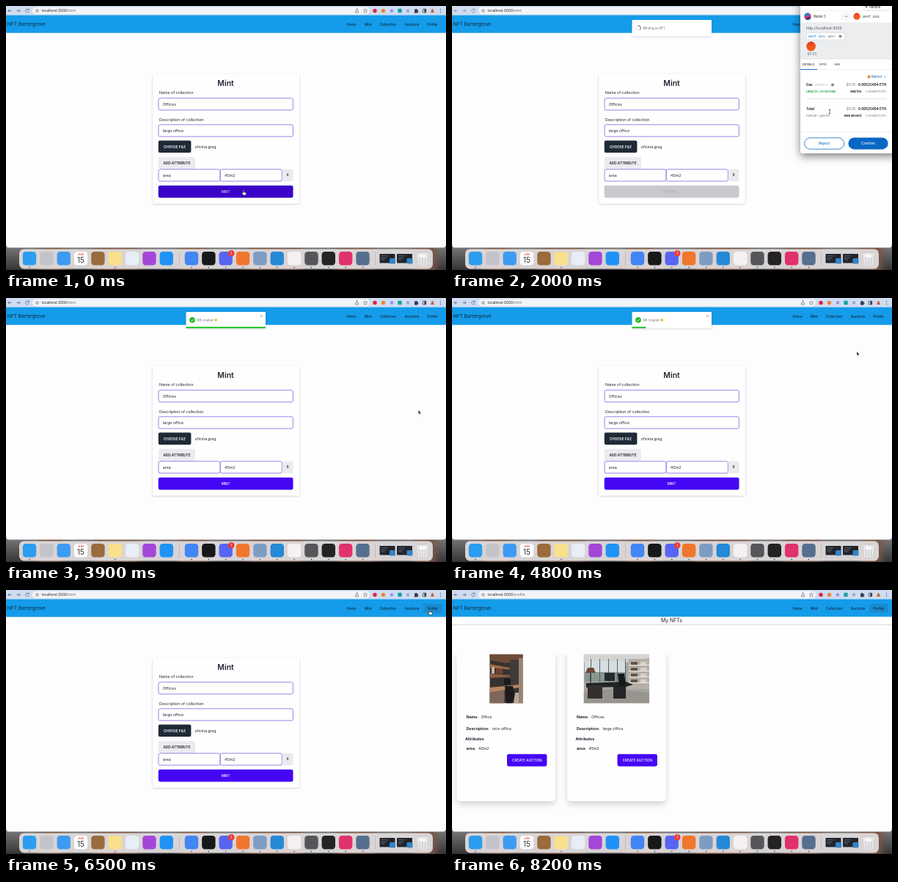
These frames come from a looping animation (600 px wide and 360 px high, 8300 ms). An HTML page:

```html
<!DOCTYPE html>
<html lang="en">
<head>
<meta charset="utf-8">
<title>Minting an NFT</title>
<style>
html, body { margin: 0; width: 100%; height: 100%; overflow: hidden; background: #fff; }
svg { display: block; width: 100vw; height: 100vh; }
text { font-family: Inter, Roboto, sans-serif; white-space: pre; }
</style>
</head>
<body>
<svg id="stage" viewBox="0 0 600 360" xmlns="http://www.w3.org/2000/svg"></svg>
<script>
const LOOP = 8300;
const VIOLET = '#4506f5', INK = '#1f2430', BLUE = '#0b69c4';

const rect = (x, y, w, h, fill, r = 0, more = '') =>
  `<rect x="${x}" y="${y}" width="${w}" height="${h}" rx="${r}" fill="${fill}" ${more}/>`;
const circle = (x, y, r, fill, more = '') =>
  `<circle cx="${x}" cy="${y}" r="${r}" fill="${fill}" ${more}/>`;
const line = (d, color, w = 0.7, more = '') =>
  `<path d="${d}" fill="none" stroke="${color}" stroke-width="${w}" ${more}/>`;
const shape = (d, fill) => `<path d="${d}" fill="${fill}"/>`;
const text = (x, y, size, str, fill = INK, weight = 400, anchor = 'start') =>
  `<text x="${x}" y="${y}" font-size="${size}" font-weight="${weight}" fill="${fill}" text-anchor="${anchor}">${str}</text>`;
const group = (id, body, more = '') => `<g id="${id}" ${more}>${body}</g>`;
const shadow = (id, dy, blur, alpha) =>
  `<filter id="${id}" x="-20%" y="-20%" width="140%" height="150%"><feDropShadow dx="0" dy="${dy}" stdDeviation="${blur}" flood-color="#000" flood-opacity="${alpha}"/></filter>`;

function toolbar() {
  const gray = '#4f5560';
  const icons = [
    line('M476.5 6v3h4V6M478.5 7.5V3.6M477.2 4.8l1.3-1.3 1.3 1.3', gray, 0.6),
    line('M490 3.7l.8 1.8 2 .2-1.5 1.3.5 2-1.8-1-1.8 1 .5-2-1.5-1.3 2-.2z', gray, 0.5),
    circle(503, 6.5, 2.7, '#e5203e') + circle(514.5, 6.5, 2.7, '#e88632'),
    circle(526, 6.5, 2.2, '#9d8cf0') + rect(534.3, 3.8, 5.4, 5.4, '#16a3a0', 1),
    circle(548, 6.5, 2.2, '#9fa8bd'),
    shape('M557 4.8h1.2a1 1 0 0 1 2 0h1.3v1.4a1 1 0 0 1 0 2v1.2H557z', '#3a3f46'),
    rect(568.3, 4.2, 4.4, 4.6, 'none', 0.5, 'stroke="#333" stroke-width=".7"') + rect(570.5, 4.2, 2.2, 4.6, '#333'),
    circle(581.5, 6.5, 3.2, '#e6cfc0') + circle(581.5, 5.6, 1.2, '#7b4b3b') + shape('M579.2 8.8a2.3 2.1 0 0 1 4.6 0z', '#b5403c'),
    [4.3, 6.5, 8.7].map(y => circle(592.5, y, 0.6, gray)).join('')
  ].join('');
  const controls =
    line('M7.5 6.5H3M5 4.5l-2 2 2 2', gray) + line('M14.5 6.5H19M17 4.5l2 2-2 2', gray) +
    line('M31 5.2A2.3 2.3 0 1 0 31.2 7.2M31.3 3.8V5.4H29.6', gray);
  return rect(0, 0, 600, 12.5, '#cfdcf3') +
    rect(36, 1.6, 460, 9.6, '#f4f4f7', 4.8) +
    group('icons', controls + icons) +
    circle(42.5, 6.5, 1.9, 'none', 'stroke="#5f6368" stroke-width=".6"') + line('M42.5 6.2v1.4M42.5 5.2v.5', gray, 0.6) +
    `<text x="48.5" y="8.2" font-size="4.9" fill="#222">localhost:3000<tspan id="path" fill="#6b6e73">/mint</tspan></text>`;
}

function navbar() {
  const items = [[464.5, 'Home'], [489, 'Mint'], [510, 'Collection'], [543.7, 'Auctions'], [574.5, 'Profile']];
  return rect(0, 12.5, 600, 24.2, '#149be9') +
    text(1.8, 27.2, 6.6, 'NFT Bartergrove', '#12263c') +
    group('hover', rect(569.5, 18.8, 25, 12.4, '#188bcf', 2)) +
    items.map(([x, s]) => text(x, 26.6, 4.65, s, '#0f2740', 500)).join('');
}

const input = (x, y, w, s) =>
  rect(x, y, w, 16.2, '#fff', 2.2, 'stroke="#8064e2" stroke-width=".8"') + text(x + 5.8, y + 10, 5.3, s);

function mintPage() {
  return rect(200, 93, 200, 176.5, '#fefefe', 2, 'filter="url(#soft)"') +
    text(299.5, 109, 10.4, 'Mint', INK, 600, 'middle') +
    text(209, 120.4, 5.25, 'Name of collection') + input(208, 125.7, 183.3, 'Offices') +
    text(209, 156.6, 5.25, 'Description of collection') + input(208, 161.8, 183.3, 'large office') +
    rect(207.8, 183.6, 44.6, 16.5, '#1f2a37', 2) + text(230, 193.5, 4.6, 'CHOOSE FILE', '#fff', 600, 'middle') +
    text(257.6, 193.6, 5.25, 'oficina.jpeg') +
    rect(208, 205.8, 50, 16.2, '#ebebef', 2) + text(233, 215.7, 4.65, 'ADD ATTRIBUTE', INK, 600, 'middle') +
    input(208, 222.7, 84, 'area') + input(292.3, 222.7, 84, '45m2') +
    rect(376.8, 222.4, 14.6, 16.6, '#ebebef', 2) + text(384, 232.4, 4.4, 'X', INK, 600, 'middle') +
    `<rect id="mintBox" x="207.7" y="244.8" width="183.8" height="16.6" rx="2.6"/>` +
    `<text id="mintText" x="299.6" y="254.7" font-size="4.6" font-weight="500" text-anchor="middle"></text>`;
}

const photos = [
  rect(51.5, 87.8, 45, 66.5, '#37322f') +
    shape('M51.5 87.8h45v5l-22 7-23-4z', '#6f4c39') + shape('M51.5 101l27 5v2.4l-27-2.600z', '#a06b49') +
    shape('M51.5 114l28 2v2.4l-28 1.600z', '#8e5b40') + rect(79, 95, 12, 38, '#3f3b3a') +
    rect(91, 93, 5.5, 61.3, '#9c8372') +
    rect(54, 105, 4, 9, '#c9b7a2') + rect(60, 107, 9, 7, '#6d4434') + rect(71, 121, 9, 8, '#1b1a1b') +
    shape('M51.5 133l40-4v4l-40 7z', '#b78661') + shape('M51.5 140l20-4v18.3h-20z', '#7d685b') +
    shape('M72 131h11l3 12-4 11.3h-8z', '#1d1b1c') + shape('M86 140h5v14.3h-7z', '#b8a89b'),
  rect(179.8, 87.8, 89.2, 66.5, '#a4a4a1') +
    shape('M179.8 87.8h89.2v5l-30 6h-59.2z', '#d3d4d2') + rect(181, 97, 55, 28, '#d4dde0') +
    rect(181, 112, 55, 13, '#889691') +
    [189, 201, 213, 225, 236].map(x => rect(x, 94, 0.9, 31, '#4d5456')).join('') +
    rect(240, 94, 29, 41, '#b5b0a8') +
    [102, 110, 118, 126].map(y => rect(241, y, 28, 1, '#f0eee9') + rect(244, y - 4, 9, 4, '#655449') + rect(257, y - 4, 8, 4, '#d8d2c6')).join('') +
    shape('M179.8 139l40-4 49.2 5v14.3h-89.2z', '#98948e') +
    shape('M183 127l54-2 10 4-10 3-54 1z', '#222425') + rect(185, 130, 20, 18, '#35302e') +
    rect(208, 113, 14, 11, '#232b30') + rect(220, 131, 17, 17, '#242628') +
    shape('M182 113l3-7h8l3 7z', '#6b4a35') + rect(188.3, 113, 1, 14, '#35302e') +
    shape('M226 114h9l2 17h-9z', '#17191b')
];

function nftCard(i, name, desc, area) {
  const x = i * 150.5, pair = (y, a, b, bx) => text(x + 19.5, y, 5.25, a, INK, 700) + text(x + bx, y, 5.25, b);
  return rect(x + 6.7, 82, 134, 206, '#fefefe', 5, 'filter="url(#lift)"') + rect(x - 4, 64, 155, 24, '#fdfcfe') + photos[i] +
    pair(174.5, 'Name:', name, 39.6) + pair(191.3, 'Description:', desc, 55) +
    text(x + 18, 205, 5.25, 'Attributes', INK, 700) + pair(217.6, 'area:', area, 36) +
    rect(x + 75, 223.8, 54.4, 16.6, VIOLET, 2.4) + text(x + 102.3, 233.8, 4.65, 'CREATE AUCTION', '#fff', 500, 'middle');
}

const profilePage = () =>
  rect(0, 36.7, 600, 10.5, '#fff') + text(299.5, 44.2, 6.9, 'My NFTs', INK, 400, 'middle') +
  line('M0 47.3H600', '#c9ccd2', 0.8) +
  nftCard(0, 'Office', 'nice office', '40m2') + nftCard(1, 'Offices', 'large office', '45m2');

const ring = (id, x, y, r, part, pale, dark) =>
  circle(x, y, r, 'none', `stroke="${pale}" stroke-width=".8"`) +
  `<circle id="${id}" cx="${x}" cy="${y}" r="${r}" fill="none" stroke="${dark}" stroke-width=".9" pathLength="1" stroke-dasharray="${part} 1"/>`;

function toast() {
  return rect(245.5, 19, 108.5, 22.2, '#fff', 1.4, 'filter="url(#soft)"') +
    group('pending', ring('spin', 254, 30, 3.3, 0.4, '#e0e0e0', '#616161') + text(260.5, 31.5, 4.2, 'Minting an NFT', '#757575')) +
    group('done', circle(254, 30, 3.8, '#17b81d') + line('M252.2 30l1.4 1.4 2.4-2.8', '#fff', 0.9) +
      text(260.5, 31.5, 4.2, 'Nft created', '#757575') + circle(286.2, 30, 1.9, '#f4bd42') +
      line('M346.9 22.9l3 3M349.9 22.9l-3 3', '#888', 0.7) +
      `<rect id="bar" x="245.5" y="39.4" height="1.8" fill="#07bc0c"/>`);
}

function popup() {
  const gray = '#6a737d', dark = '#24272a';
  const fee = (y, label, sum) => text(559.3, y, 3.8, label, dark, 700, 'end') + text(592, y, 3.8, sum, gray, 400, 'end');
  const total = y => text(550.3, y, 4.4, '$10.16', gray, 400, 'end') + text(592, y, 4.5, '0.00525404 ETH', dark, 700, 'end');
  const info = (x, y) => circle(x, y, 1.9, gray) + line(`M${x} ${y - 0.3}v1.3M${x} ${y - 1.1}v.5`, '#fff', 0.5);
  const tx =
    rect(561, -5, 35.5, 10.5, '#fff', 5, 'stroke="#d6d9dc" stroke-width=".6"') + circle(565, 1, 1.4, gray) +
    text(569, 2.6, 4, 'Hardhat', dark) + line('M475 6.6H600M475 22.8H600', '#dde0e3', 0.5) +
    circle(485, 14.2, 4.8, '#e8366f') + shape('M480.3 13.2a4.8 4.8 0 0 1 7-3.3l-1 4.6z', '#1c8cc9') + shape('M481.5 17.5l5-3 3 1.4a4.8 4.8 0 0 1-8 1.6z', '#3c3a8e') +
    text(493, 15.8, 4.4, 'Wallet 3', dark) +
    circle(537, 14.2, 5, '#fff', 'stroke="#d0d4d8" stroke-width=".6"') + line('M534.8 14.2h4.2M537.4 12.5l1.7 1.7-1.7 1.7', gray, 0.6) +
    circle(552, 14.2, 4.6, '#f2571a') + shape('M548.5 11.2a4.6 4.6 0 0 1 6-.8l-3 3z', '#e8433f') + text(559.5, 15.8, 4.1, '0xe7f...0512', dark) +
    rect(475, 23, 125, 50, '#ecedef') + text(483, 32.2, 4.9, 'http://localhost:3000', '#4a4f55') +
    rect(483, 36.6, 52.5, 9.4, '#fff', 1.5, 'stroke="#c9cdd2" stroke-width=".5"') +
    text(485.5, 42.9, 4.1, '0xe7f...0512', BLUE) + text(510.2, 42.9, 4.1, ': MINT', gray) + info(529.5, 41.3) +
    circle(489.6, 55, 6.4, '#f2571a') + shape('M484.5 51.2a6.4 6.4 0 0 1 9.5-.9l-4 4z', '#e6402f') + text(484.5, 66.8, 4.7, '$0.00', gray) +
    text(478, 81.3, 3.9, 'DETAILS', dark, 500) + text(501, 81.3, 3.9, 'DATA', dark) + text(521.5, 81.3, 3.9, 'HEX', dark) +
    line('M475 86.7H600', '#d9dcdf', 0.5) + line('M475 86.5H498', BLUE, 0.9) +
    circle(568.6, 96.5, 2.1, '#e88632') + text(572, 98, 4.3, 'Market', BLUE) + line('M589.4 95l1.5 1.5-1.5 1.5', BLUE, 0.6) +
    text(483, 109.2, 4.5, 'Gas', dark, 700) + text(493.5, 109.2, 4.1, 'estimated', '#c1c5c9') + info(519, 107.5) + total(109.2) +
    text(483, 118, 3.7, 'Likely in &lt; 30 seconds', '#28a745', 700) + fee(118, 'Max fee:', '0.0068931 ETH') +
    line('M483 126.5H592', '#d6d9dc', 0.7) +
    text(483, 141.8, 4.5, 'Total', dark, 700) + total(141.8) +
    text(483, 150.8, 3.9, 'Amount + gas fee', gray) + fee(150.8, 'Max amount:', '0.0068931 ETH') +
    line('M475 171.5H600', '#e3e5e8', 0.5) +
    rect(480.7, 179.8, 54, 15.4, '#fff', 7.7, `stroke="${BLUE}" stroke-width=".8"`) + text(507.6, 189.1, 4.9, 'Reject', BLUE, 500, 'middle') +
    `<rect id="confirm" x="540.4" y="179.4" width="54.2" height="16" rx="8"/>` + text(567.5, 189.1, 4.9, 'Confirm', '#fff', 500, 'middle');
  return rect(475, -8, 130, 208.7, '#fff', 3, 'filter="url(#deep)"') +
    group('loading', circle(538, 79, 25, '#e2761b') + ring('wait', 537.5, 117.6, 4, 0.72, '#fdf3ea', '#f08a24')) +
    group('tx', tx);
}

function dock() {
  const apps = ['#2c9df0', '#c3c4ca', '#3d9bf3', '', '#9a6b3c', '#f9e08a', '#e8eef6', '#a347d8', '#1e93f5'];
  const open = ['#4285f4', '#17181a', '#5865f2', '#f0762c', '#7d9cc4', '#2489d6', '#f4f1f4', '#55565a', '#232326', '#e0326b', '#55708e'];
  const tile = (x, c) => c && rect(x - 9.2, 335, 18.4, 18.4, c, 4.2);
  const mini = x => rect(x - 10.5, 338, 21, 12.5, '#22252c', 0.8) +
    [340.5, 343, 345.5].map((y, i) => rect(x - 8.5, y, 9 - i * 2, 0.7, '#747f91')).join('') + rect(x + 3, 344, 8, 7.5, '#3285c8', 1.5);
  return rect(0, 322, 600, 38, 'url(#desk)') +
    group('wood', [[44, 34], [118, 62], [236, 40], [330, 75], [452, 52], [556, 30]].map(([x, w]) => rect(x, 329, w, 31, '#7a5644')).join(''), 'filter="url(#blur)"') +
    rect(18, 331.4, 564, 27, '#e2dedf', 6.5, 'fill-opacity=".93"') +
    apps.map((c, i) => tile(32 + i * 23.35, c)).join('') +
    open.map((c, i) => tile(253 + i * 23.35, c) + circle(253 + i * 23.35, 356.5, 0.75, '#333')).join('') +
    [32, 149].map(x => circle(x, 356.5, 0.75, '#333')).join('') +
    rect(92.8, 335, 18.4, 18.4, '#fff', 4.2) + text(102, 340.4, 3.8, 'JUN', '#e5433d', 600, 'middle') + text(102, 350.2, 10, '15', '#333', 400, 'middle') +
    circle(307.3, 337.2, 4.2, '#ee3b35') + text(307.3, 339, 5, '1', '#fff', 400, 'middle') +
    line('M236.5 335V354M503.5 335V354', '#b3aeb1', 0.6) + mini(520) + mini(543.5) +
    shape('M560.5 336h15l-2 17.5h-11z', '#e9eaec') + line('M560.5 336h15M563.5 337l1.2 16M568 337v16M572.5 337l-1.2 16', '#a8abb0', 0.6) +
    shape('M563 339l3-2 3 2 4-1-.7 5h-8.5z', '#f7f7f7');
}

const cursors =
  group('arrow', '<path d="M0 0v5.6l1.3-1.2.9 2 .9-.4-.9-2h1.7z" fill="#111" stroke="#fff" stroke-width=".5"/>') +
  group('hand', '<path d="M-.7-2.6q.7-.8 1.3 0V-.2l2.3.6q.8.3.6 1.2L3 4H-.4L-2.4 1.3q0-1 .9-.7l.8.6z" fill="#fff" stroke="#111" stroke-width=".6"/>') +
  group('beam', line('M-1.3-3Q0-3 0-2V2Q0 3-1.3 3M1.3-3Q0-3 0-2M0 2Q0 3 1.3 3', '#222', 0.7));

const defs = shadow('soft', 0.8, 1.3, 0.22) + shadow('lift', 4, 4, 0.17) + shadow('deep', 4, 6, 0.5) +
  '<filter id="blur"><feGaussianBlur stdDeviation="4 1"/></filter>' +
  '<linearGradient id="desk" x2="0" y2="1"><stop offset=".2" stop-color="#757374"/><stop offset="1" stop-color="#353435"/></linearGradient>';

document.getElementById('stage').innerHTML =
  `<defs>${defs}</defs>` +
  dock() + shape('M0 0H600V325q0 4.5-4.5 4.5H4.5Q0 329.5 0 325z', '#fdfcfe') +
  toolbar() + navbar() + group('mint', mintPage()) + group('profile', profilePage()) +
  group('toast', toast()) + group('popup', popup()) + group('cursor', cursors);

const ui = {};
document.querySelectorAll('[id]').forEach(e => ui[e.id] = e);
const show = (id, on) => ui[id].setAttribute('display', on ? 'inline' : 'none');
const set = (id, k, v) => ui[id].setAttribute(k, v);
const clamp = v => Math.max(0, Math.min(1, v));
const ease = v => v * v * (3 - 2 * v);

const T = { click: 450, toast: 500, popup: 1000, tx: 1900, close: 3700, done: 3900, gone: 5010, profile: 6900 };
// time, x, y
const track = [
  [0, 324, 254], [520, 324, 254], [1050, 397, 213], [1350, 397, 213], [1950, 515, 144], [2250, 515, 144],
  [2850, 567, 190], [3600, 567, 190], [4400, 552, 73], [5600, 552, 73], [6300, 578, 30], [LOOP, 578, 30]
];

function pointer(t) {
  const i = Math.max(1, track.findIndex(p => p[0] > t));
  const [t0, x0, y0] = track[i - 1], [t1, x1, y1] = track[i];
  const k = ease(clamp((t - t0) / (t1 - t0)));
  return [x0 + (x1 - x0) * k, y0 + (y1 - y0) * k];
}

function draw(t) {
  const [x, y] = pointer(t);
  const onProfile = t >= T.profile, open = t >= T.popup && t < T.close;
  const busy = t >= T.click && t < T.done, done = t >= T.done;
  const inBox = (l, top, r, b) => x > l && x < r && y > top && y < b;
  const overMint = !busy && inBox(208, 245, 391, 261);
  const overConfirm = open && t >= T.tx && inBox(540, 179, 595, 196);
  const overProfile = inBox(569, 18, 595, 33);

  show('mint', !onProfile);
  show('profile', onProfile);
  ui.path.textContent = onProfile ? '/profile' : '/mint';
  set('icons', 'opacity', open ? 0.65 : 1);
  show('hover', overProfile);

  set('mintBox', 'fill', busy ? '#c9c9cd' : overMint ? '#3b03c8' : VIOLET);
  set('mintText', 'fill', busy ? '#b0b0b5' : overMint ? '#d6c9f5' : '#fff');
  ui.mintText.textContent = busy ? 'MINTING...' : 'MINT';

  const enter = ease(clamp((t - T.toast) / 200)), leave = ease(clamp((t - T.gone) / 220));
  show('toast', t >= T.toast && leave < 1);
  set('toast', 'transform', `translate(0 ${-45 * (1 - enter + leave)})`);
  set('toast', 'opacity', enter * (1 - leave));
  show('pending', !done);
  show('done', done);
  set('bar', 'width', 108.5 * clamp((T.gone - 20 - t) / (T.gone - 20 - T.done)));
  set('spin', 'transform', `rotate(${t * 1.2 + 20} 254 30)`);
  set('wait', 'transform', `rotate(${t * 0.9 + 135} 537.5 117.6)`);

  show('popup', open);
  show('loading', t < T.tx);
  show('tx', t >= T.tx);
  set('confirm', 'fill', overConfirm ? '#064d92' : '#0767c3');

  const hand = overMint || overConfirm || overProfile;
  const beam = open && t >= T.tx && inBox(480, 90, 596, 156);
  set('cursor', 'transform', `translate(${x} ${y})`);
  show('cursor', !onProfile);
  show('hand', hand);
  show('beam', beam);
  show('arrow', !hand && !beam);
}

const start = performance.now();
function frame(now) {
  draw(Math.max(0, now - start) % LOOP);
  requestAnimationFrame(frame);
}
draw(0);
requestAnimationFrame(frame);
</script>
</body>
</html>
```
